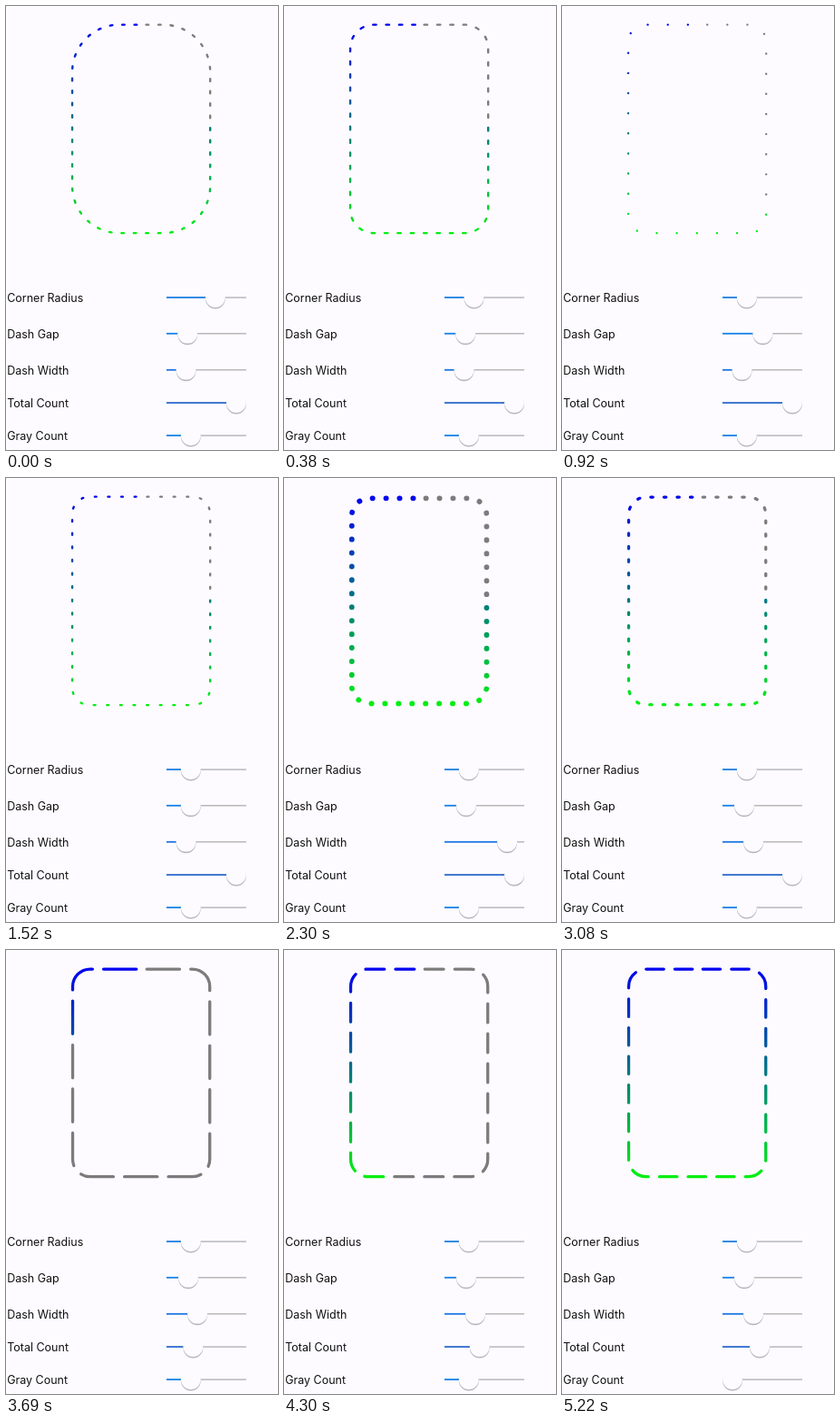
Write an HTML page that moves like this. It is 300 by 489 pixels and loops after 5.24 s.

```html
<!DOCTYPE html>
<html lang="en">
<head>
<meta charset="utf-8">
<title>Dashed border controls</title>
<style>
  html, body { margin: 0; width: 100%; height: 100%; overflow: hidden; background: #fdfbff; }
  svg { display: block; width: 300px; height: 489px; }
  text { font: 12.5px Inter, Roboto, sans-serif; fill: #111; }
  .dash { fill: none; stroke-linecap: round; }
</style>
</head>
<body>
<svg id="stage" viewBox="0 0 300 489">
  <defs>
    <linearGradient id="fade" gradientUnits="userSpaceOnUse" x1="0" y1="20" x2="0" y2="251">
      <stop offset="0" stop-color="#0000f0"/>
      <stop offset="1" stop-color="#00f010"/>
    </linearGradient>
    <filter id="soft" x="-20%" y="-20%" width="140%" height="140%">
      <feGaussianBlur stdDeviation="0.7"/>
    </filter>
  </defs>
  <path id="color" class="dash" stroke="url(#fade)"/>
  <path id="gray" class="dash" stroke="#7c7c7c"/>
</svg>
<script>
const LOOP = 5240;
const BOX = { left: 71.9, top: 19.4, right: 226.4, bottom: 251.3 };

// Each slider: label, track y, fill colour, [time, value] keys
const SLIDERS = [
  { label: 'Corner Radius', y: 321, fill: '#1a80e6', keys: [[0, .65], [540, .24]] },
  { label: 'Dash Gap', y: 360.7, fill: '#1583ee',
    keys: [[790, .185], [920, .505], [1130, .74], [1520, .24], [1670, .197]] },
  { label: 'Dash Width', y: 400.7, fill: '#1a78e6',
    keys: [[1940, .16], [2300, .88], [2490, 1], [3080, .35]] },
  { label: 'Total Count', y: 437, fill: '#2a6cd4',
    keys: [[3380, 1], [3690, .28], [3900, .12], [4400, .455]] },
  { label: 'Gray Count', y: 473, fill: '#1583ee', keys: [[4620, .24], [5000, 0]] }
];

const stage = document.getElementById('stage');
const colorPath = document.getElementById('color');
const grayPath = document.getElementById('gray');

function set(el, attrs) {
  for (const k in attrs) el.setAttribute(k, attrs[k]);
  return el;
}

function add(tag, attrs, parent = stage) {
  return parent.appendChild(set(document.createElementNS('http://www.w3.org/2000/svg', tag), attrs));
}

for (const s of SLIDERS) {
  add('text', { x: 1.2, y: s.y + 5.2 }).textContent = s.label;
  add('rect', { x: 177, y: s.y - .6, width: 88, height: 1.4, fill: '#b4b4b6' });
  s.bar = add('rect', { x: 177, y: s.y - .8, height: 1.7, fill: s.fill });
  s.knob = add('g', {});
  add('circle', { r: 10.9, cy: 1.6, fill: '#b8b8ba', filter: 'url(#soft)' }, s.knob);
  add('circle', { r: 10.9, fill: '#fdfbff' }, s.knob);
}

// Smooth curve through the keys, flat at the ends and turning points
function valueAt(keys, t) {
  const last = keys.length - 1;
  if (t <= keys[0][0]) return keys[0][1];
  if (t >= keys[last][0]) return keys[last][1];
  const rise = i => (keys[i + 1][1] - keys[i][1]) / (keys[i + 1][0] - keys[i][0]);
  const slope = i => {
    if (i === 0 || i === last) return 0;
    const a = rise(i - 1), b = rise(i);
    return a * b > 0 ? 2 * a * b / (a + b) : 0;
  };
  let i = 0;
  while (t > keys[i + 1][0]) i++;
  const span = keys[i + 1][0] - keys[i][0], u = (t - keys[i][0]) / span;
  const ease = u * u * (3 - 2 * u);
  return keys[i][1] + (keys[i + 1][1] - keys[i][1]) * ease
    + span * u * (1 - u) * (slope(i) * (1 - u) - slope(i + 1) * u);
}

// Clockwise from the top centre
function outline(inset, r) {
  const l = BOX.left + inset, t = BOX.top + inset;
  const w = BOX.right - inset - l, h = BOX.bottom - inset - t;
  const x = w / 2 - r, y = h - 2 * r;
  const arc = (dx, dy) => `a${r} ${r} 0 0 1 ${dx * r} ${dy * r}`;
  return {
    d: `M${l + w / 2} ${t}h${x}${arc(1, 1)}v${y}${arc(-1, 1)}h${-2 * x}${arc(-1, -1)}v${-y}${arc(1, -1)}h${x}`,
    length: 2 * (w + h) - (8 - 2 * Math.PI) * r
  };
}

function drawDashes(path, d, width, from, to, period, space) {
  const dash = Math.max(period - space, .01);
  const gap = period - dash;
  const list = [];
  for (let i = from; i < to; i++) list.push(dash, i < to - 1 ? gap : 2000);
  set(path, {
    d, 'stroke-width': width, 'stroke-dasharray': list.join(' '),
    'stroke-dashoffset': -(from * period + gap / 2),
    visibility: to > from ? 'visible' : 'hidden'
  });
}

function draw(t) {
  const values = SLIDERS.map(s => {
    const v = valueAt(s.keys, t), x = 188 + 66 * v;
    set(s.bar, { width: x - 177 });
    set(s.knob, { transform: `translate(${x} ${s.y})` });
    return v;
  });
  const [radius, gap, thick, total, gray] = values;
  const width = 1.6 + 4.8 * thick;
  const space = 2 + 35 * gap + width;
  const shape = outline(width / 2, 80 * radius);
  const wanted = Math.round(1 + 49 * total);
  const count = Math.max(1, Math.min(wanted, Math.floor(shape.length / space)));
  const grays = Math.min(count, Math.round(50 * gray));
  const period = shape.length / count;
  drawDashes(grayPath, shape.d, width, 0, grays, period, space);
  drawDashes(colorPath, shape.d, width, grays, count, period, space);
}

const start = performance.now();
function tick() {
  draw(Math.max(0, performance.now() - start) % LOOP);
  requestAnimationFrame(tick);
}
tick();
</script>
</body>
</html>
```
